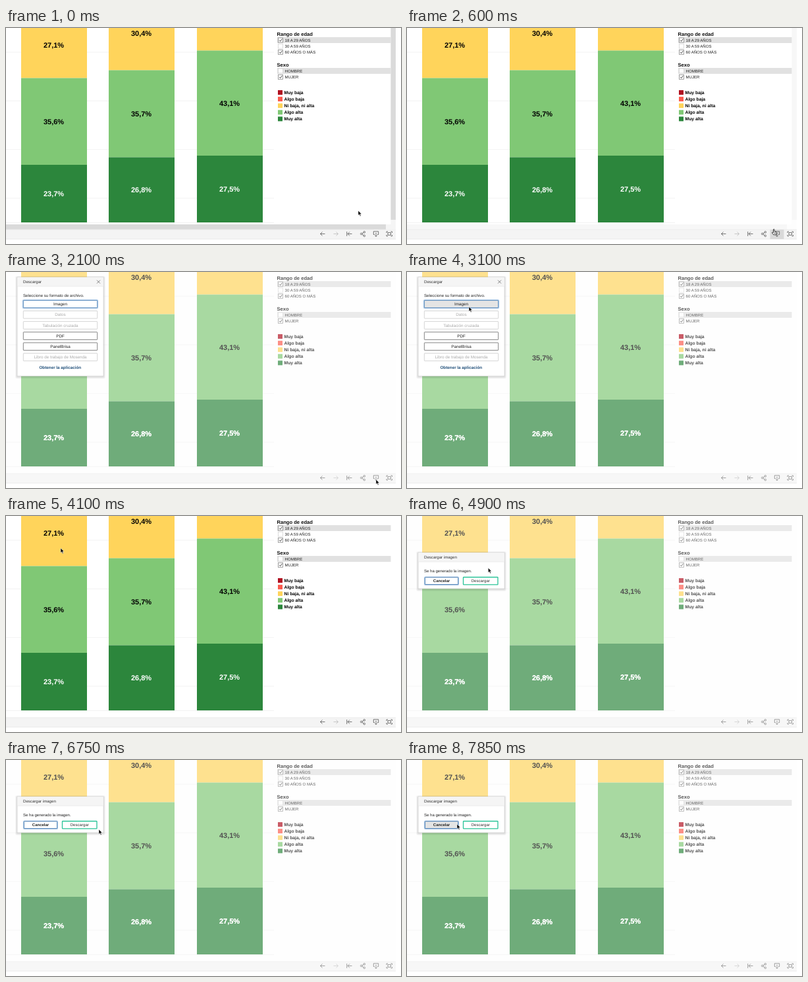
These frames come from a looping animation (600 px wide and 330 px high, 7.9 s). An HTML page:

```html
<!DOCTYPE html>
<html lang="es">
<head>
<meta charset="utf-8">
<style>
html, body { margin: 0; width: 100%; height: 100%; overflow: hidden; background: #fff; }
svg { display: block; width: 600px; height: 330px; font-family: "Liberation Sans", Arial, sans-serif; text-rendering: geometricPrecision; }
</style>
</head>
<body>
<svg id="stage" viewBox="0 0 600 330"></svg>
<script>
const LOOP = 7900;
const YELLOW = '#ffd45b', LIGHT = '#80c875', DARK = '#2c863c';

const rect = (x, y, w, h, fill, extra = '') =>
  `<rect x="${x}" y="${y}" width="${w}" height="${h}" fill="${fill}" ${extra}/>`;
const line = (d, color, w = 0.8) =>
  `<path d="${d}" fill="none" stroke="${color}" stroke-width="${w}"/>`;
// y is the vertical middle of the capitals
const text = (s, x, y, size, fill = '#222', extra = '') =>
  `<text x="${x}" y="${y + size * 0.36}" font-size="${size}" fill="${fill}" ${extra}>${s}</text>`;
const group = (id, content) => `<g id="${id}">${content}</g>`;
const BOLD = 'font-weight="700"';
const MID = 'text-anchor="middle"';

function bar(x, top, split, labels) {
  const shades = ['#000', '#000', '#fff'];
  return rect(x, 0, 100, top, YELLOW) + rect(x, top, 100, split - top, LIGHT) +
    rect(x, split, 100, 297 - split, DARK) +
    labels.map(([s, y], i) => text(s, x + 49.5, y, 11, shades[i + 3 - labels.length], `${BOLD} ${MID}`)).join('');
}

function option(label, y, checked, shaded) {
  return (shaded ? rect(412, y - 4.5, 172.5, 9, '#e1e1e1') : '') +
    rect(413.5, y - 3.5, 7, 7, '#fff', `stroke="${checked ? '#888' : '#d4d4d4'}" stroke-width=".8"`) +
    (checked ? line(`M415 ${y}l1.6 1.8l2.8 -3.7`, '#333', 0.9) : '') +
    text(label, 423.5, y, 6.1, '#222');
}

function chart() {
  const grid = [37, 111.3, 185.6, 260].map(y => line(`M0 ${y}H407`, '#f0f0f0')).join('');
  const legend = [['Muy baja', '#b01020'], ['Algo baja', '#fb5b4e'], ['Ni baja, ni alta', YELLOW],
    ['Algo alta', LIGHT], ['Muy alta', DARK]].map(([s, c], i) =>
    rect(413, 95 + i * 10.1, 7, 7, c) + text(s, 422.5, 98.5 + i * 10.1, 6.8, '#000', BOLD)).join('');
  return grid + line('M0 297.3H407', '#eee') +
    bar(23, 76.5, 209, [['27,1%', 26], ['35,6%', 143], ['23,7%', 253]]) +
    bar(156, 64.5, 197.5, [['30,4%', 8], ['35,7%', 131], ['26,8%', 247]]) +
    bar(290, 34.5, 195, [['43,1%', 115], ['27,5%', 246]]) +
    text('Rango de edad', 411.5, 9, 7.6, '#111', BOLD) +
    option('18 A 29 AÑOS', 18.5, true, true) + option('30 A 59 AÑOS', 27.7, false) +
    option('60 AÑOS O MÁS', 36.8, true) +
    text('Sexo', 411.5, 56, 7.6, '#111', BOLD) +
    option('HOMBRE', 65.5, false, true) + option('MUJER', 74.8, true) + legend;
}

function toolbar() {
  const ink = '#555';
  return rect(0, 308, 592, 14.5, '#f4f4f4') + line('M0 308H592M0 322.5H592', '#e2e2e2', 0.6) +
    group('hot', rect(551.5, 308, 21, 14.5, '#d9d9d9')) +
    line('M484.5 314.5H477.5M480.5 311.5l-3 3l3 3', ink) +
    line('M497.5 314.5H504.5M501.5 311.5l3 3l-3 3', '#bbb') +
    line('M525.5 314.5H519M522 311.5l-3 3l3 3M517.7 311V318', ink) +
    line('M544 312L540 314.5L544 317.5', ink) +
    [[544.3, 311.8], [539.7, 314.5], [544.3, 317.5]].map(([x, y]) =>
      `<circle cx="${x}" cy="${y}" r="1.3" fill="#f4f4f4" stroke="${ink}" stroke-width=".8"/>`).join('') +
    line('M560 315.5H558.3V310.8H565.7V315.5H564M562 312.5V318.5M560.3 316.8l1.7 1.8l1.7 -1.8', ink) +
    line('M578 313V311H580M584.5 311H586.5V313M586.5 316V318H584.5M580 318H578V316', ink) +
    rect(580, 312.7, 4.5, 3.6, 'none', `stroke="${ink}" stroke-width=".8"`);
}

function button(s, x, y, w, h, border, color, extra = '', bw = 0.8, id = '') {
  return rect(x, y - h / 2, w, h, '#fff', `rx=".6" stroke="${border}" stroke-width="${bw}" id="${id}"`) +
    text(s, x + w / 2, y, 6.3, color, `${MID} ${extra}`);
}

function dialog(title, y, h) {
  const shadow = [3, 2, 1].map(k => rect(17 - k, y - k + 1, 131 + 2 * k, h + 2 * k, '#000', `opacity=".04" rx="${k}"`)).join('');
  return shadow + rect(17, y, 131, h, '#fff', 'stroke="#c8c8c8" stroke-width=".6"') +
    rect(17.3, y + 0.3, 130.4, 13.7, '#f5f5f5') + line(`M17 ${y + 14}H148`, '#e4e4e4', 0.6) +
    text(title, 26, y + 7.2, 6.1, '#333');
}

function formats() {
  const rows = [['Datos', 0], ['Tabulación cruzada', 0], ['PDF', 1], ['PanelBrisa', 1], ['Libro de trabajo de Mosenda', 0]];
  return dialog('Descargar', 8, 151) + line('M138 12.5l5 5M143 12.5l-5 5', '#555', 0.7) +
    text('Seleccione su formato de archivo.', 26, 36, 6.15) +
    rect(25.5, 42.6, 114, 12.8, 'none', 'stroke="#b9d3ee" stroke-width="1.4" rx="1"') +
    button('Imagen', 26.3, 49, 112.4, 11.4, '#5687b8', '#222', '', 1, 'image') +
    rows.map(([s, on], i) => button(s, 26.3, 65.2 + i * 16.2, 112.4, 11.6, on ? '#666' : '#c9c9c9', on ? '#222' : '#a9a9a9')).join('') +
    text('Obtener la aplicación', 82.3, 146.2, 6.3, '#1f4e79', `${BOLD} ${MID}`);
}

function ready() {
  return dialog('Descargar imagen', 56, 55) +
    text('Se ha generado la imagen.', 26, 83.5, 6.05) +
    rect(26.5, 93, 52, 12.4, 'none', 'stroke="#b9d3ee" stroke-width="1.2" rx="1"') +
    button('Cancelar', 27.3, 99.2, 50.4, 11, '#4479b0', '#222', BOLD + ' style="font-size:6px"', 1, 'cancel') +
    button('Descargar', 85.5, 99.2, 52.5, 11.4, '#28c397', '#333', 'style="font-size:6.1px"', 1.3);
}

const scrollbars = rect(584.5, 0, 7.5, 308, '#f5f5f5') + rect(0, 300, 592, 8, '#f5f5f5') +
  rect(584.5, 0, 7.5, 293, '#dadada') + rect(0, 300, 577, 7.7, '#dadada');
const arrow = '<path d="M0 0V7.2L1.7 5.7L2.9 8.4L4.1 7.9L2.9 5.3H5.1Z" fill="#000" stroke="#fff" stroke-width=".5"/>';
const hand = '<path d="M-.6 0Q.2-.8 .9 0V3L3.8 3.9Q4.6 4.3 4.4 5.4L3.8 8.2H-.4L-2.7 5Q-2.4 3.9-.6 5Z" fill="#fff" stroke="#111" stroke-width=".8"/><path d="M1.2 4.5V6.8M2.5 4.7V6.8" stroke="#111" stroke-width=".6"/>';
const busy = rect(-4, -10, 9, 20, '#6fa9bd') +
  [0, 1, 2, 3, 4].map(i => line(`M-3 ${-7 + i * 4}L3.5 ${-9 + i * 4}`, i % 2 ? '#3c7fa5' : '#b4d6dc', 1.5)).join('') +
  rect(-4, -10, 2, 20, '#467f99');

const stage = document.getElementById('stage');
stage.innerHTML = chart() + toolbar() + group('bars', scrollbars) +
  group('veil', rect(0, 0, 592, 322.5, '#fafafa', 'opacity=".32"') +
    [['23,7%', 72.5, 253], ['26,8%', 205.5, 247], ['27,5%', 339.5, 246]].map(([s, x, y]) =>
      text(s, x, y, 11, '#fff', `${BOLD} ${MID}`)).join('')) +
  group('formats', formats()) + group('ready', ready()) +
  group('pointer', group('arrow', arrow) + group('hand', hand) + group('busy', busy));

// time, x, y
const path = [[0, 535, 279], [200, 535, 279], [750, 562, 314], [1050, 566, 319], [1400, 562, 317],
  [2300, 562, 317], [2950, 94, 53], [3300, 94, 53], [3700, 83, 49], [4700, 83, 49],
  [5150, 179, 121], [5900, 179, 121], [6500, 141, 106], [6900, 141, 106], [7450, 76, 98], [LOOP, 76, 98]];

function pointerAt(t) {
  const i = path.findIndex(p => p[0] > t);
  const [t0, x0, y0] = path[i - 1], [t1, x1, y1] = path[i];
  const u = (t - t0) / (t1 - t0), e = u * u * (3 - 2 * u);
  return [x0 + (x1 - x0) * e, y0 + (y1 - y0) * e];
}

const el = id => document.getElementById(id);
const show = (id, on) => { el(id).style.display = on ? '' : 'none'; };
const shade = (id, on) => el(id).setAttribute('fill', on ? '#e4e4e4' : '#fff');
const within = (t, a, b) => t >= a && t < b;

function draw(t) {
  const [x, y] = pointerAt(t);
  const first = within(t, 1950, 4050), second = t >= 4900;
  const waiting = within(t, 5100, 5500), overTool = y > 307 && !first;
  el('pointer').setAttribute('transform', `translate(${x} ${y})`);
  el('bars').style.opacity = Math.max(0, Math.min(1, (650 - t) / 250));
  show('hot', overTool);
  show('veil', first || second);
  show('formats', first);
  show('ready', second);
  show('hand', overTool);
  show('busy', waiting);
  show('arrow', !overTool && !waiting);
  shade('image', x < 139 && y > 43 && y < 55);
  shade('cancel', x < 78 && y > 93 && y < 105);
}

const start = performance.now();
function tick() {
  draw((performance.now() - start) % LOOP);
  requestAnimationFrame(tick);
}
tick();
</script>
</body>
</html>
```
